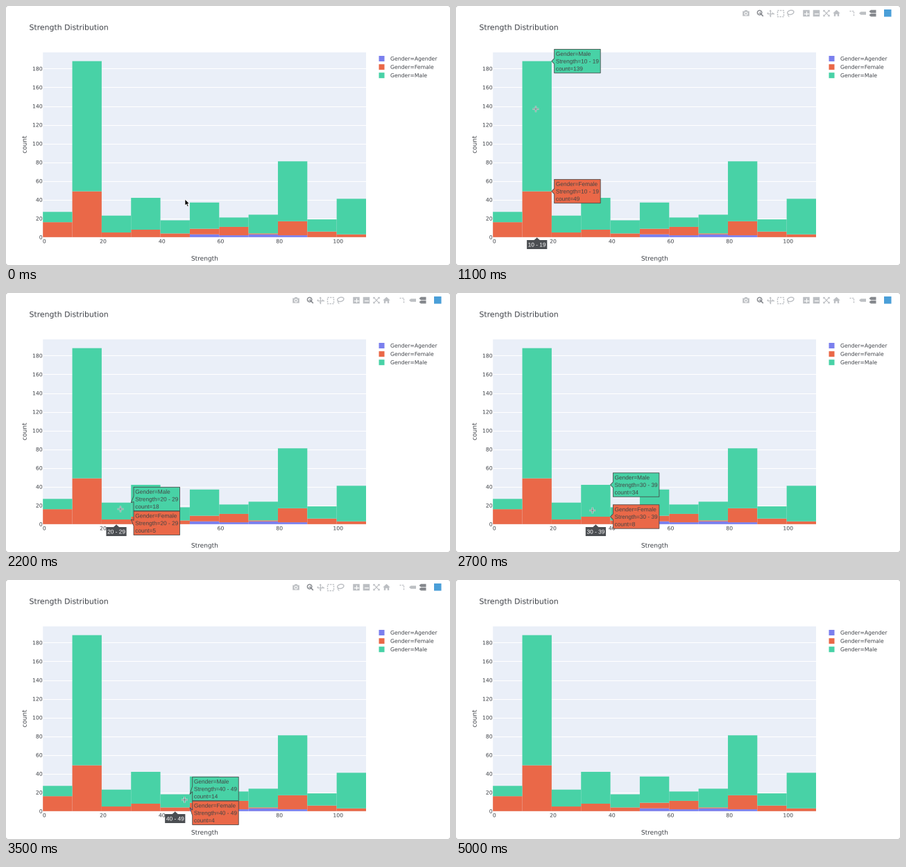
A matplotlib script for the animation above (5100 ms loop, 640 by 374 pixels).

```python
import numpy as np
import matplotlib.pyplot as plt
from matplotlib.animation import FuncAnimation
from matplotlib.patches import (Circle, Ellipse, FancyBboxPatch, PathPatch,
                                Polygon, Rectangle)
from matplotlib.textpath import TextPath
from matplotlib.transforms import Affine2D

W, H, DPI = 640, 374, 100
STEP, LOOP = 100, 5100
PT = 72 / DPI

LEFT, RIGHT, TOP, BASE = 53.2, 519, 67, 333.8
BIN_W = (RIGHT - LEFT) / 11
UNIT = 1.352
INK = "#3f4248"
ICON, ACTIVE = "#bcbfc3", "#85888d"
COLORS = {"Agender": "#7a7fee", "Female": "#ea6848", "Male": "#48d2a6"}
COUNTS = {
    "Agender": [0, 0, 0, 0, 0, 3, 2, 3, 2, 0, 0],
    "Female": [16, 49, 5, 8, 4, 6, 9, 1, 15, 6, 3],
    "Male": [11, 139, 18, 34, 14, 28, 10, 20, 64, 13, 38],
}
TOPS = dict(zip(COUNTS, np.cumsum(list(COUNTS.values()), axis=0)))

# Pointer path: time in ms, x, y
PATH = np.array([
    (0, 258, 279), (200, 235, 255), (400, 150, 180), (500, 122, 156),
    (600, 115, 148), (1200, 115, 149), (1500, 131, 262), (1600, 157, 307),
    (2200, 165, 312), (2500, 174, 312), (2800, 208, 315), (3100, 255, 319),
    (3600, 258, 317), (4200, 274, 307), (4600, 290, 368),
])
ENTER, EXIT, BAR_OFF = 200, 4600, 4800

fig = plt.figure(figsize=(W / DPI, H / DPI), dpi=DPI, facecolor="#bdbdbd")
ax = fig.add_axes([0, 0, 1, 1])
ax.set_xlim(0, W)
ax.set_ylim(H, 0)
ax.axis("off")


def shape(patch, z=2):
    patch.set_zorder(z)
    return ax.add_patch(patch)


def label(x, y, s, px, color=INK, font="DejaVu Sans", ha="left", z=3, turn=0):
    """Text as outlines, so it sits at fractions of a pixel."""
    path = TextPath((0, 0), s, size=px, prop={"family": font})
    ends = path.get_extents()
    shift = {"left": 0, "center": (ends.x0 + ends.x1) / 2, "right": ends.x1}[ha]
    place = Affine2D().translate(-shift, 0).scale(1, -1)
    place.rotate_deg(-turn).translate(x, y)
    return shape(PathPatch(place.transform_path(path), fc=color, lw=0,
                           snap=False), z)


def line(xs, ys, color, px=1.0, z=2, **kw):
    return ax.plot(xs, ys, color=color, lw=px * PT, zorder=z, **kw)[0]


def box(x, y, w, h, color, z=2):
    return shape(Rectangle((x, y), w, h, fc=color, lw=0, snap=False), z)


def poly(points, fill, edge="none", px=0.0, z=2):
    return shape(Polygon(points, closed=True, fc=fill, ec=edge, lw=px * PT,
                         snap=False), z)


def level(value):
    return BASE - UNIT * value


def draw_chart():
    shape(FancyBboxPatch((0, 0), W, H, fc="white", lw=0,
                         boxstyle="round,pad=0,rounding_size=3.5"), -1)
    box(LEFT, TOP, RIGHT - LEFT, BASE - TOP, "#eaeff8", z=0)
    for v in range(0, 181, 20):
        line([LEFT, RIGHT], [level(v)] * 2, "white", 1.1, z=0.5,
             solid_capstyle="butt")
        label(52.2, level(v) + 2.9, str(v), 7.7, ha="right")
    for name, counts in COUNTS.items():
        for i, n in enumerate(counts):
            if n:
                box(LEFT + i * BIN_W, level(TOPS[name][i]), BIN_W, UNIT * n,
                    COLORS[name], z=1)
    for k in range(6):
        label(55.3 + 84.72 * k, 342.4, str(20 * k), 7.7, ha="center")
    for i, (name, color) in enumerate(COLORS.items()):
        box(537.5, 72 + 12.1 * i, 8, 8, color)
        label(554, 78.7 + 12.1 * i, f"Gender={name}", 7.7)
    label(33.5, 34.6, "Strength Distribution", 10.9)
    label(286.3, 367.6, "Strength", 9, ha="center")
    label(29.6, 200, "count", 9, ha="center", turn=90)


def tag(x, y, color):
    return poly([(x - 5, y), (x - 2.5, y - 2.2), (x + 5, y - 2.2),
                 (x + 5, y + 2.2), (x - 2.5, y + 2.2)], color)


def draw_toolbar():
    y = 10.5
    parts = [
        # camera
        box(413.2, y - 3, 9.6, 7, ICON), box(416, y - 4.4, 4, 2, ICON),
        shape(Circle((418, y + 0.5), 2, fc=ICON, ec="white", lw=0.8)),
        # zoom
        shape(Circle((437.6, y - 0.9), 3.2, fc="none", ec=ACTIVE, lw=1)),
        line([440, 442.2], [y + 1.5, y + 3.7], ACTIVE, 1.6),
        line([436.3, 438.9], [y - 0.9] * 2, ACTIVE, 0.8),
        line([437.6] * 2, [y - 2.2, y + 0.4], ACTIVE, 0.8),
        # pan
        line([448.5, 457.5], [y] * 2, ICON, 1.2),
        line([453] * 2, [y - 4.5, y + 4.5], ICON, 1.2),
        # box select and lasso
        shape(Rectangle((463, y - 4.5), 9, 9, fc="none", ec=ICON, lw=1,
                        ls=(0, (1.6, 1)))),
        shape(Ellipse((482.3, y - 1.2), 9.4, 6, angle=-15, fc="none",
                      ec=ICON, lw=1)),
        line([479, 478.4, 480], [y + 1, y + 3, y + 4.8], ICON),
        # zoom in, zoom out
        box(500.2, y - 4.7, 9.5, 9.4, ICON), box(514.7, y - 4.7, 9.5, 9.4, ICON),
        line([502.4, 507.5], [y] * 2, "white", 1.3),
        line([505] * 2, [y - 2.5, y + 2.5], "white", 1.3),
        line([517, 522], [y] * 2, "white", 1.3),
        # autoscale
        line([530, 538], [y - 4, y + 4], ICON, 1.1),
        line([530, 538], [y + 4, y - 4], ICON, 1.1),
        # home
        poly([(543.3, y), (548.5, y - 4.8), (553.7, y), (552.2, y),
              (552.2, y + 4.3), (549.8, y + 4.3), (549.8, y + 1.3),
              (547.2, y + 1.3), (547.2, y + 4.3), (544.8, y + 4.3),
              (544.8, y)], ICON),
        # spike lines
        line([566.5, 573, 573], [y - 3.5, y - 3.5, y + 4], ICON, 1.3,
             ls=(0, (1.7, 1))),
        # hover modes
        tag(586, y, ICON), tag(600.5, y - 2.6, ACTIVE), tag(600.5, y + 2.6, ACTIVE),
        box(617, 5, 10.5, 10.5, "#4a9fd8"),
    ]
    for cx, cy, dx, dy in [(448.2, y, 1, 0), (457.8, y, -1, 0),
                           (453, y - 4.8, 0, 1), (453, y + 4.8, 0, -1)]:
        base = np.array([cx + 2 * dx, cy + 2 * dy])
        side = 1.7 * np.array([dy, dx])
        parts.append(poly([(cx, cy), base + side, base - side], ICON))
    for sx in (-1, 1):
        for sy in (-1, 1):
            cx, cy = 534 + 4.6 * sx, y + 4.6 * sy
            parts.append(poly([(cx, cy), (cx - 3 * sx, cy), (cx, cy - 3 * sy)],
                              ICON))
    return parts


def draw_hover(i):
    span = f"{10 * i} - {10 * i + 9}"
    names = [n for n in reversed(COUNTS) if COUNTS[n][i]]
    anchors = np.array([level(TOPS[n][i]) for n in names])
    centers = anchors
    pitch = 34.7
    if np.diff(anchors).min() < pitch:
        offsets = np.arange(len(names)) - (len(names) - 1) / 2
        centers = anchors.mean() + pitch * offsets
    tip = LEFT + (i + 1) * BIN_W
    x0, x1 = tip + 3.8, tip + 70.3
    parts = []
    for name, anchor, c in zip(names, anchors, centers):
        dark = name == "Agender"
        fill = "#7a80f9" if dark else COLORS[name]
        ink = "white" if dark else "#444444"
        parts.append(poly([(tip, anchor), (x0, c - 4), (x0, c - 17.2),
                           (x1, c - 17.2), (x1, c + 17.2), (x0, c + 17.2),
                           (x0, c + 4)], fill, ink, 0.8, z=5))
        rows = f"Gender={name}", f"Strength={span}", f"count={COUNTS[name][i]}"
        for k, row in enumerate(rows):
            parts.append(label(x0 + 2.2, c + 3 + 10.7 * (k - 1), row, 8.3, ink,
                               "Liberation Sans", z=5))
    mid = LEFT + (i + 0.5) * BIN_W
    half = 14.6
    parts.append(poly([(mid, 334.3), (mid + 4, 338), (mid + half, 338),
                       (mid + half, 351), (mid - half, 351),
                       (mid - half, 338), (mid - 4, 338)], "#4b4e52", z=5))
    parts.append(label(mid, 347.5, span, 8.3, "white", "Liberation Sans",
                       "center", z=5))
    return parts


def pointer(t):
    return [np.interp(t, PATH[:, 0], PATH[:, k]) for k in (1, 2)]


def draw_arrow(x, y):
    outline = np.array([(0, 0), (0, 9.2), (2.1, 7.3), (3.5, 10.7), (5.1, 10),
                        (3.7, 6.8), (6.5, 6.6)])
    return [poly(outline + (x, y), "black", "white", 0.7, z=8)]


def draw_cross(x, y):
    parts = []
    for color, px, r in [("#d5ece4", 2.4, 4.4), ("#66757a", 0.9, 4.2)]:
        style = dict(z=8, snap=False, solid_capstyle="butt")
        parts.append(line([x - r, x + r], [y, y], color, px, **style))
        parts.append(line([x, x], [y - r, y + r], color, px, **style))
    return parts


draw_chart()
live = []


def update(frame):
    t = frame * STEP
    while live:
        live.pop().remove()
    if ENTER <= t < BAR_OFF:
        live.extend(draw_toolbar())
    # The hover box trails the pointer by one step.
    x, y = pointer(t - STEP)
    if ENTER < t <= EXIT and y < BASE:
        live.extend(draw_hover(int((x - LEFT) // BIN_W)))
    x, y = pointer(t)
    if t < EXIT:
        inside = t >= ENTER and y < BASE
        live.extend((draw_cross if inside else draw_arrow)(x, y))
    return live


anim = FuncAnimation(fig, update, frames=LOOP // STEP, interval=STEP,
                     init_func=lambda: [], repeat=True, repeat_delay=0,
                     blit=False)
plt.show()
```
